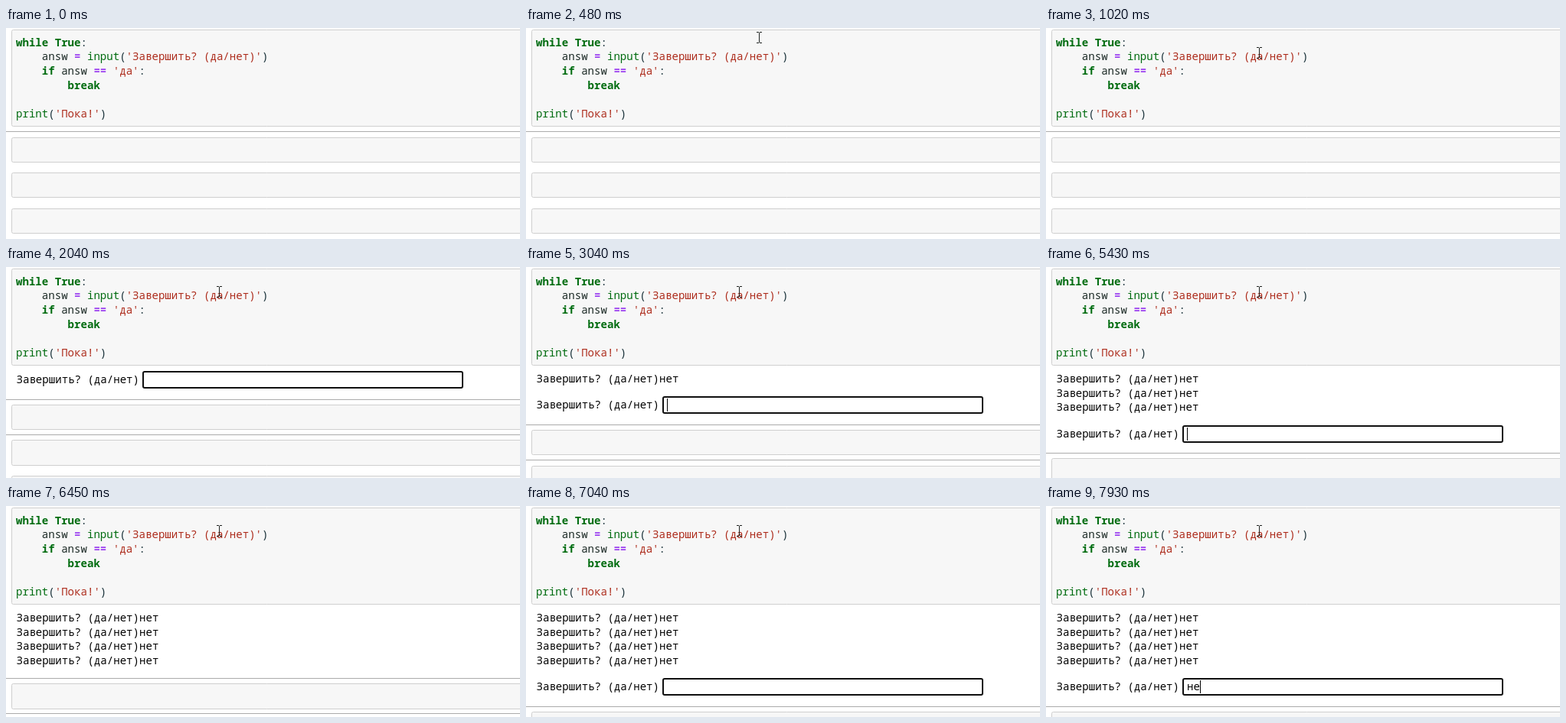
Write an HTML page with a canvas that moves like this. It is 671 px wide and 276 px high and loops after 8 s.

```html
<!DOCTYPE html>
<html lang="ru">
<head>
<meta charset="utf-8">
<style>
  html, body { margin: 0; width: 100%; height: 100%; overflow: hidden; background: #fff; }
  canvas { display: block; }
</style>
</head>
<body>
<canvas id="stage" width="671" height="276"></canvas>
<script>
const ctx = document.getElementById('stage').getContext('2d');
const LOOP = 8000;
const CHAR = 8.45;
const ROW = 18.6;
const PROMPT = 'Завершить? (да/нет)';
const ANSWER = 'нет';

const KEYWORD = '#006c10', OPERATOR = '#9a3cf0', STRING = '#ad2c1c';
const NAME = '#1c2a26', PUNCT = '#183038';

// Code tokens: baseline, then [column, text, colour, bold]
const code = [
  [24, [0, 'while', KEYWORD, true], [6, 'True', KEYWORD, true], [10, ':', PUNCT]],
  [42, [4, 'answ', NAME], [9, '=', OPERATOR, true], [11, 'input', KEYWORD], [16, '(', PUNCT],
    [17, `'${PROMPT}'`, STRING], [38, ')', PUNCT]],
  [61, [4, 'if', KEYWORD, true], [7, 'answ', NAME], [12, '==', OPERATOR, true],
    [15, "'да'", STRING], [19, ':', PUNCT]],
  [80, [8, 'break', KEYWORD, true]],
  [117, [0, 'print', KEYWORD], [5, '(', PUNCT], [6, "'Пока!'", STRING], [13, ')', PUNCT]]
];

// Pointer positions: time, x, y
const pointer = [
  [140, 583, 246], [207, 500, 168], [273, 405, 88], [340, 318, 14],
  [480, 304, 12], [610, 294, 14],
  [750, 287, 18], [840, 282, 24], [930, 279, 29], [1020, 278, 32]
];

// Session states: time, answered lines, typed letters (-1 = no field), caret shown
const session = [
  [1480, 0, 0, true], [2040, 0, 0, false], [2510, 0, 1, true], [2610, 0, 2, true], [2710, 0, 3, true],
  [3040, 1, 0, true], [3590, 1, 0, false], [3660, 1, 1, true], [3800, 1, 2, true], [3940, 1, 3, true],
  [4340, 2, 0, true], [4750, 2, 1, true], [4880, 2, 2, true], [5020, 2, 3, true],
  [5430, 3, 0, true], [5840, 3, 0, false], [5980, 3, 1, true], [6110, 3, 3, true],
  [6450, 4, -1, false], [6510, 4, 0, true], [7040, 4, 0, false], [7510, 4, 0, true],
  [7780, 4, 1, true], [7930, 4, 2, true]
];

function latest(list, t) {
  let found = null;
  for (const item of list) if (item[0] <= t) found = item;
  return found;
}

function rect(x, y, w, h, color) {
  ctx.fillStyle = color;
  ctx.fillRect(x, y, w, h);
}

function text(str, x, y, color = '#000', bold = false) {
  ctx.font = `${bold ? 'bold ' : ''}14.08px "Noto Sans Mono", "DejaVu Sans Mono", monospace`;
  ctx.fillStyle = color;
  ctx.fillText(str, x, y);
}

function roundBox(x, y, w, h, r, fill, stroke, line) {
  ctx.beginPath();
  ctx.roundRect(x, y, w, h, r);
  ctx.fillStyle = fill;
  ctx.fill();
  ctx.strokeStyle = stroke;
  ctx.lineWidth = line;
  ctx.stroke();
}

// Edges snap to whole pixels
function cell(top, height = 32.2) {
  const y = Math.round(top);
  roundBox(7.5, y + 0.5, 700, Math.round(top + height) - y, 2, '#f7f7f7', '#cfcfcf', 1);
}

function divider(y) {
  rect(0, Math.round(y), 671, 1, '#ababab');
}

function drawCode() {
  cell(2, 126);
  for (const [y, ...tokens] of code)
    for (const [col, str, color, bold] of tokens) text(str, 13 + col * CHAR, y, color, bold);
}

function drawField(top, typed, caret) {
  text(PROMPT, 13.5, top + 16);
  roundBox(179, top + 1, 417, 21, 2, '#fff', '#101010', 2);
  text(ANSWER.slice(0, typed), 184, top + 16);
  if (caret) rect(Math.round(184 + typed * CHAR - 0.4), top + 3, 1, 17, '#000');
}

function drawSession([, lines, typed, caret]) {
  for (let i = 0; i < lines; i++) text(PROMPT + ANSWER, 13.5, Math.round(151 + i * ROW));
  const fieldTop = lines ? 150.72 + lines * ROW : 136;
  if (typed >= 0) drawField(Math.round(fieldTop), typed, caret);
  const edge = typed < 0 ? 225.4 : fieldTop + 36.88;
  divider(edge);
  cell(edge + 7);
  divider(edge + 46);
  cell(edge + 53.5);
  cell(edge + 100);
}

function drawPointer([, x, y]) {
  const color = '#202422';
  rect(x, y - 6, 1, 13, color);
  for (const edge of [y - 7, y + 7]) {
    rect(x - 3, edge, 3, 1, color);
    rect(x + 1, edge, 3, 1, color);
  }
}

function draw(t) {
  rect(0, 0, 671, 276, '#fff');
  drawCode();
  const state = latest(session, t);
  if (state) {
    drawSession(state);
  } else {
    divider(135);
    [143, 189, 236].forEach(top => cell(top));
  }
  const spot = latest(pointer, t);
  if (spot) drawPointer(spot);
}

function frame() {
  draw(performance.now() % LOOP);
  requestAnimationFrame(frame);
}
frame();
</script>
</body>
</html>
```
